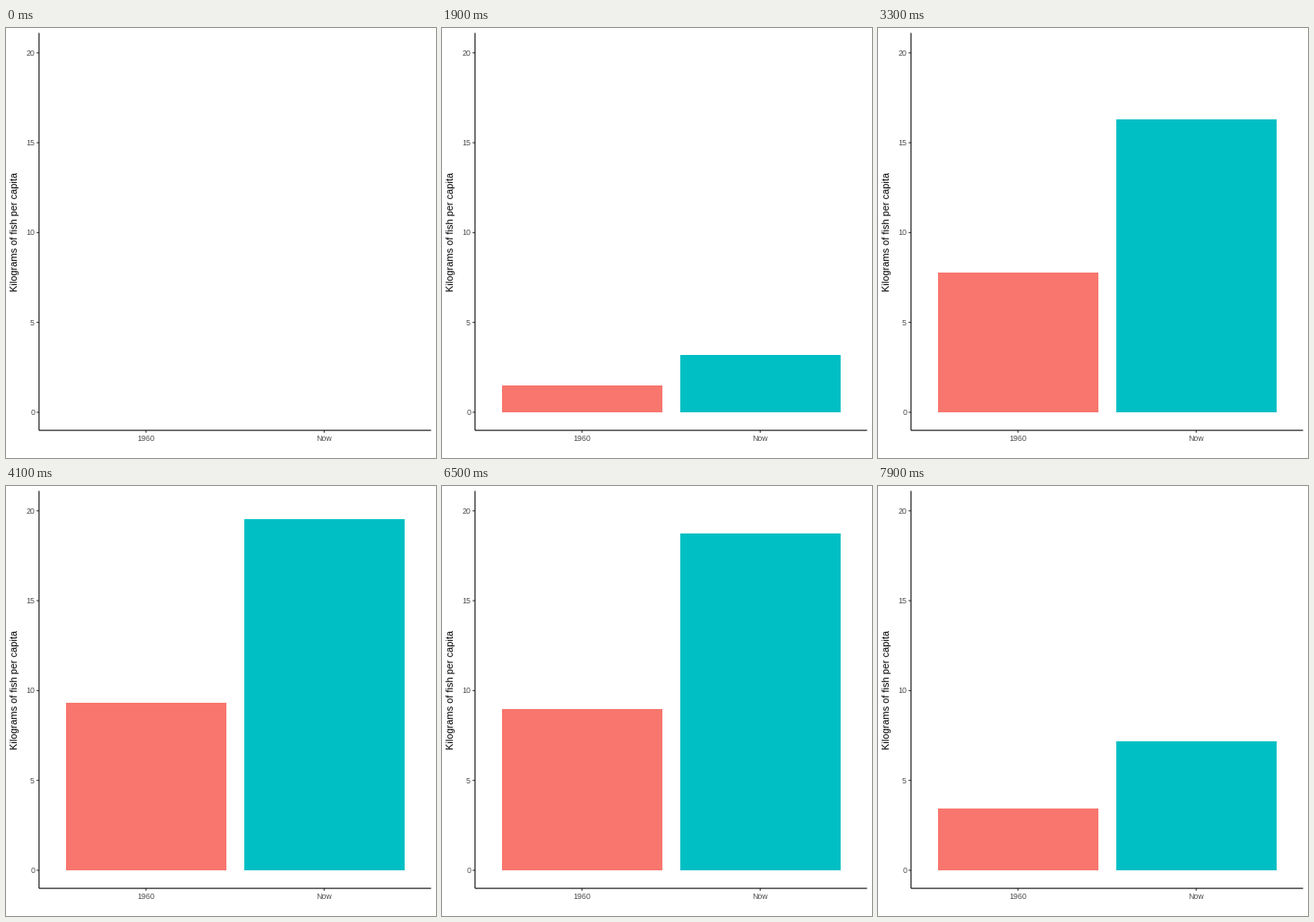
Recreate the animation shown at these times as a matplotlib script. Size 480x480 px, loop 8000 ms.

```python
import math

import matplotlib.pyplot as plt
from matplotlib.animation import FuncAnimation
from matplotlib.patches import Rectangle

SIZE, DPI = 480, 100
STEP_MS, LOOP_MS = 100, 8000
LEFT, RIGHT, TOP, BOTTOM = 36.9, 474.5, 5.5, 449.1
BASE = 428.95          # pixel row of value 0
UNIT = 20.06           # pixels per kilogram
RISE_START, FALL_START, MOVE_MS = 300, 5300, 4700

plt.rcParams["font.family"] = "Liberation Sans"


def points(pixels):
    return pixels * 72 / DPI


def cubic_in_out(u):
    u = min(max(u, 0), 1)
    return 4 * u**3 if u < 0.5 else 1 - 4 * (1 - u) ** 3


def growth(ms):
    rise = cubic_in_out((ms - RISE_START) / MOVE_MS)
    fall = cubic_in_out((ms - FALL_START) / MOVE_MS)
    return rise - fall


fig = plt.figure(figsize=(SIZE / DPI, SIZE / DPI), dpi=DPI, facecolor="white")
ax = fig.add_axes([0, 0, 1, 1])
ax.set_xlim(0, SIZE)
ax.set_ylim(SIZE, 0)
ax.axis("off")


def line(xs, ys, color):
    ax.plot(xs, ys, color=color, lw=points(1.07), snap=False,
            solid_capstyle="butt", zorder=3)


def label(x, y, text, size=8.8, color="#4D4D4D", **kwargs):
    ax.text(x, y, text, fontsize=points(size), color=color, va="baseline", **kwargs)


for value in range(0, 21, 5):
    y = BASE - value * UNIT
    line([LEFT - 2.75, LEFT], [y, y], "#333333")
    label(32, y + 3.1, str(value), ha="right")

for x, name in ((156.2, "1960"), (355.2, "Now")):
    line([x, x], [BOTTOM, BOTTOM + 2.75], "#333333")
    label(x, 461, name, ha="center")

line([LEFT, LEFT], [TOP, BOTTOM], "black")
line([LEFT, RIGHT], [BOTTOM, BOTTOM], "black")
label(13.2, 227.2, "Kilograms of fish per capita", 11, "black",
      ha="center", rotation=90, rotation_mode="anchor")

bars = []
for x, value, color in ((67, 9.6, "#F8766D"), (266, 20.1, "#00BFC4")):
    bar = Rectangle((x, 429), 179, 0, facecolor=color, lw=0, antialiased=False)
    bars.append((ax.add_patch(bar), value))


def update(frame):
    share = growth(frame * STEP_MS)
    for bar, value in bars:
        top = math.floor(BASE - share * value * UNIT + 0.5)
        bar.set_y(top)
        bar.set_height(429 - top)
        bar.set_visible(top < 429)
    return [bar for bar, _ in bars]


anim = FuncAnimation(fig, update, frames=LOOP_MS // STEP_MS, interval=STEP_MS,
                     repeat=True, repeat_delay=0)
plt.show()
```
